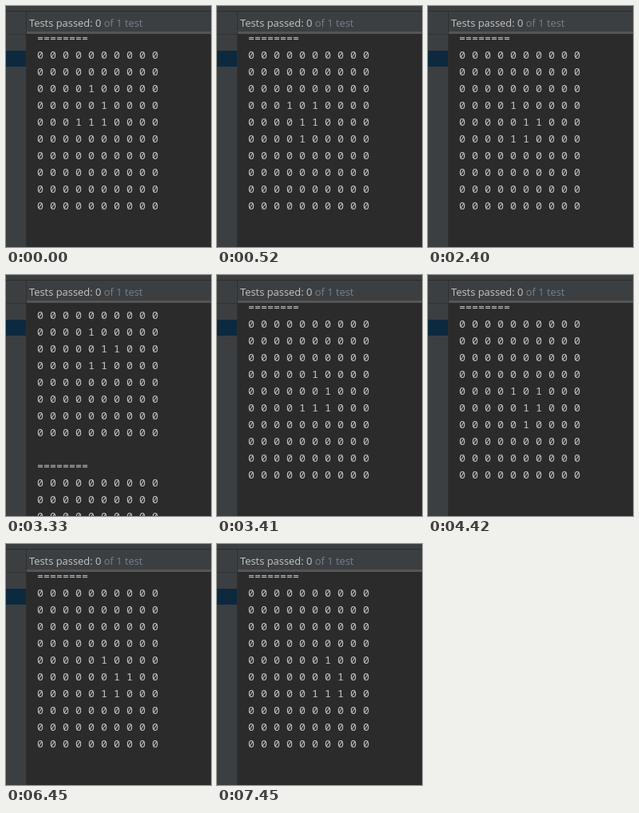
These frames come from a looping animation (257x302 px, 8000 ms). An HTML page:

```html
<!DOCTYPE html>
<html lang="en">
<head>
<meta charset="utf-8">
<title>Test console</title>
<style>
  html, body { margin: 0; width: 100%; height: 100%; overflow: hidden; background: #3c3f41; }
  #stage { position: relative; width: 257px; height: 302px; overflow: hidden; background: #3c3f41; }
  #stage > div { position: absolute; }
  .top { left: 0; top: 6px; width: 257px; height: 1px; background: #2b2b2b; }
  .edge { left: 25px; top: 7px; width: 1px; height: 295px; background: #2f2f2f; }
  .rule { left: 0; top: 35px; width: 25px; height: 1px; background: #323232; }
  .picked { left: 0; top: 56px; width: 25px; height: 20px; background: #0d293e; }
  .bar { left: 26px; top: 32px; width: 231px; height: 3px; background: #555; }
  .status {
    left: 29px; top: 11px; line-height: 20px; white-space: pre;
    font-family: "Open Sans", "Noto Sans", sans-serif; font-size: 12.9px; color: #c4c4c4;
  }
  .status span { color: #748092; }
  .console { left: 26px; top: 35px; width: 231px; height: 267px; overflow: hidden; background: #2b2b2b; }
  #log {
    position: absolute; left: 13px; top: -5px; margin: 0;
    font-family: "Noto Sans Mono", "DejaVu Sans Mono", monospace;
    font-size: 13.333px; line-height: 21px; color: #c6c6c6;
  }
</style>
</head>
<body>
<div id="stage">
  <div class="top"></div>
  <div class="edge"></div>
  <div class="rule"></div>
  <div class="picked"></div>
  <div class="status">Tests passed: 0 <span>of 1 test</span></div>
  <div class="bar"></div>
  <div class="console"><pre id="log"></pre></div>
</div>
<script>
  const SIZE = 10, LOOP = 8000, NUDGE = 53;
  // Each print shows a partly scrolled view, then settles on the new board.
  const PRINTS = [[290, 370], [1300, 1390], [2320, 2400], [3330, 3410],
                  [4340, 4420], [5350, 5430], [6370, 6450], [7380, 7450]];
  const GLIDER = [[2, 4], [3, 5], [4, 3], [4, 4], [4, 5]];

  const grid = fn => Array.from({ length: SIZE }, (_, r) =>
    Array.from({ length: SIZE }, (_, c) => fn(r, c)));

  function evolve(board) {
    return grid((r, c) => {
      let n = 0;
      for (let dr = -1; dr <= 1; dr++)
        for (let dc = -1; dc <= 1; dc++)
          if (dr || dc) n += board[r + dr]?.[c + dc] ?? 0;
      return +(n === 3 || (n === 2 && board[r][c] === 1));
    });
  }

  const print = board =>
    "========\n" + board.map(row => row.join(" ")).join("\n") + "\n\n";

  const pages = [];
  let board = grid((r, c) => +GLIDER.some(([y, x]) => y === r && x === c));
  for (let i = 0; i <= PRINTS.length; i++) {
    pages.push(print(board));
    board = evolve(board);
  }

  const log = document.getElementById("log");
  let shown = "";

  function draw(t) {
    const started = PRINTS.filter(([start]) => t >= start).length;
    const settled = PRINTS.filter(([, end]) => t >= end).length;
    const key = started + ":" + settled;
    if (key === shown) return;
    shown = key;
    const moving = started > settled;
    log.textContent = pages.slice(settled, started + 1).join("");
    log.style.transform = `translateY(${moving ? -NUDGE : 0}px)`;
  }

  const origin = performance.now();
  function tick() {
    draw((performance.now() - origin) % LOOP);
    requestAnimationFrame(tick);
  }
  tick();
</script>
</body>
</html>
```
